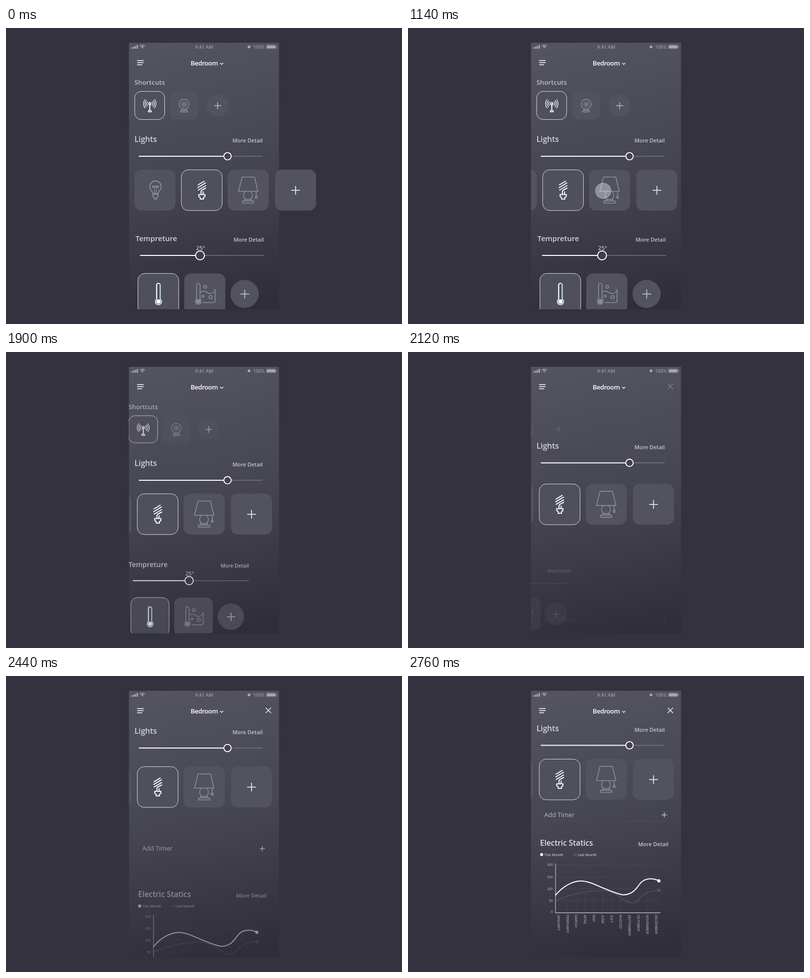
These frames come from a looping animation (800x600 px, 5260 ms). An HTML page:

```html
<!DOCTYPE html>
<html lang="en">
<head>
<meta charset="utf-8">
<title>Smart home</title>
<style>
html, body { margin: 0; width: 100%; height: 100%; overflow: hidden; background: #35323f; }
svg { display: block; width: 800px; height: 600px; }
text { font-family: "Open Sans", "Noto Sans", sans-serif; font-weight: 600; fill: #d3d3d8; }
.h { font-size: 15.4px; }
.more { font-size: 10.9px; fill: #c6c6cc; text-anchor: end; }
.status { font: 400 9.8px Roboto, sans-serif; fill: #a9a9b1; }
.tiny { font: 400 6.9px "Liberation Sans", Arial, sans-serif; fill: #b4b4bb; }
.card { fill: #52535e; }
.on { fill: #4f505c; stroke: #dcdce0; stroke-width: 1; }
.line { fill: none; stroke: #fff; stroke-width: 2; stroke-linecap: round; stroke-linejoin: round; }
.dim { stroke: #8f8f98; stroke-width: 1.6; }
.rest { stroke: #74747e; stroke-width: 1.6; }

.move { animation: 5260ms cubic-bezier(.333, 0, .667, 1) infinite both; }
.scroll { animation-name: scroll; animation-timing-function: cubic-bezier(.33, 0, .28, 1); }
.touch { animation-name: drag, tap; animation-timing-function: cubic-bezier(.33, 0, .28, 1), linear; }
.exit { animation-name: shrink, leave; animation-timing-function: cubic-bezier(.333, 0, .667, .333), cubic-bezier(.333, 0, .667, 0); }
.shortcuts { --dx: -186px; --size: .84; transform-origin: 355px 147px; }
.heat { --dx: -266px; --size: .714; transform-origin: 391px 501px; }
.head { animation-name: head; }
.cards { animation-name: cards; }
.timer { animation-name: timer; }
.stats { animation-name: stats; }
.close { animation-name: close; }

@keyframes scroll { 0%, 14.829% { translate: 0 0; } 24.715%, 100% { translate: -89px 0; } }
@keyframes drag { 0%, 14.829% { translate: 0 0; } 24.715%, 100% { translate: -122px 0; } }
@keyframes tap { 0%, 14.829% { opacity: 0; } 17.5%, 22% { opacity: 1; } 24.715%, 100% { opacity: 0; } }
@keyframes shrink { 0%, 31.179% { scale: 1; opacity: 1; } 41.825%, 100% { scale: var(--size); opacity: 0; } }
@keyframes leave { 0%, 31.749% { translate: 0 0; } 41.825%, 100% { translate: var(--dx) 0; } }
@keyframes head { 0%, 36.027% { translate: 0 0; } 47.959%, 100% { translate: 0 -119.5px; } }
@keyframes cards { 0%, 37.262% { translate: 0 0; } 49.049%, 100% { translate: 0 -119px; } }
@keyframes timer { 0%, 38.403% { translate: 0 281px; opacity: 0; } 50.19%, 100% { translate: 0 0; opacity: 1; } }
@keyframes stats { 0%, 40.684% { translate: 0 200px; opacity: 0; } 52.471%, 100% { translate: 0 0; opacity: 1; } }
@keyframes close { 0%, 36.027% { opacity: 0; } 47.959%, 100% { opacity: 1; } }
</style>
</head>
<body>
<svg viewBox="0 0 800 600">
  <defs>
    <linearGradient id="screen" gradientUnits="userSpaceOnUse" x1="345" y1="30" x2="455" y2="570">
      <stop offset="0" stop-color="#53545f"/>
      <stop offset=".45" stop-color="#474753"/>
      <stop offset="1" stop-color="#302d38"/>
    </linearGradient>
    <clipPath id="edge"><rect x="248.5" y="30" width="551.5" height="540"/></clipPath>
  </defs>
  <rect width="800" height="600" fill="#35323f"/>
  <rect x="248.5" y="30" width="303" height="540" fill="url(#screen)"/>

  <!-- status bar -->
  <g fill="#a9a9b1">
    <path d="M253.5 39h2.4v3h-2.4zM257 37.5h2.4v4.5h-2.4zM260.5 36h2.4v6h-2.4zM264 34.5h2.6v7.5h-2.6z"/>
    <path d="M273.7 39.6a2.5 2.5 0 0 1 3.6 0l-1.8 2.2z"/>
    <path class="line" style="stroke:#a9a9b1;stroke-width:1.4;stroke-linecap:butt" d="M270.5 36.8a7 7 0 0 1 10 0M272.5 38.6a4.4 4.4 0 0 1 6 0"/>
    <circle cx="491" cy="38.3" r="2.8"/>
    <rect x="527" y="35.5" width="17" height="5.6" rx="1"/>
    <rect x="526" y="34.5" width="19" height="7.6" rx="1.6" fill="none" stroke="#a9a9b1" stroke-width=".6"/>
    <rect x="545.6" y="37" width="1.2" height="2.6"/>
  </g>
  <text class="status" x="382" y="42">9:41 AM</text>
  <text class="status" x="499" y="42">100%</text>

  <!-- title bar -->
  <path class="line" style="stroke-width:1.6" d="M265.5 66h12M265.5 70.3h12M265.5 74.5h9"/>
  <text x="373" y="76" font-size="13" letter-spacing="-.42" style="fill:#fff">Bedroom</text>
  <path class="line" style="stroke-width:1.4" d="M433 71.3l2.8 2.5 2.8-2.5"/>
  <path class="line move close" style="stroke-width:1.3" d="M525 64.8l10 10M535 64.8l-10 10"/>

  <g clip-path="url(#edge)">
    <g class="move exit shortcuts">
      <text x="259.5" y="115" font-size="13.3" style="fill:#bfbfc6">Shortcuts</text>
      <rect class="on" x="260" y="128.5" width="60.5" height="57" rx="13"/>
      <g class="line" style="stroke-width:1.5">
        <circle cx="290.5" cy="153.5" r="2.2" stroke-width="2"/>
        <g stroke-linecap="butt" stroke-width="1.3">
          <circle cx="290.5" cy="153.5" r="6.2" pathLength="360" stroke-dasharray="90 90" stroke-dashoffset="45"/>
          <circle cx="290.5" cy="153.5" r="9.4" pathLength="360" stroke-dasharray="90 90" stroke-dashoffset="45"/>
          <circle cx="290.5" cy="153.5" r="12.6" pathLength="360" stroke-dasharray="90 90" stroke-dashoffset="45"/>
        </g>
        <path stroke-width="2" d="M290.5 156.5v10"/>
        <path d="M287.5 167.5h6v2.5h-6z"/>
      </g>
      <rect class="card" x="331" y="128.5" width="57.5" height="57" rx="12"/>
      <g class="line dim" style="stroke-width:1.4">
        <circle cx="359.8" cy="154.5" r="10"/>
        <circle cx="359.8" cy="154.5" r="4.6"/>
        <circle cx="359.8" cy="154.5" r="1.7"/>
        <path d="M356 164.5l-1 2.5h9.6l-1-2.5M353.3 167.3h13v3h-13z"/>
      </g>
      <circle class="card" cx="427.4" cy="157" r="22.5"/>
      <path class="line" style="stroke:#b0b0b7;stroke-width:1.7" d="M421 157.4h13M427.5 151v13"/>
    </g>

    <g class="move exit heat">
      <text class="h" x="261.5" y="432" style="font-size:14.9px">Tempreture</text>
      <text class="more" x="521" y="433">More Detail</text>
      <text x="384" y="449.5" style="font-size:11.6px;font-weight:400;fill:#eee">25°</text>
      <path class="line rest" d="M392 461h128.500"/>
      <path class="line" d="M271.500 461H392"/>
      <circle cx="392" cy="461" r="9" fill="#3f3d49" stroke="#fff" stroke-width="2"/>
      <rect class="on" x="266.500" y="497.500" width="82.500" height="83" rx="14"/>
      <path class="line" style="stroke:#c9eefa" d="M304.500 549.500v-28.500a3.500 3.500 0 0 1 7 0v28.500a6.200 6.200 0 1 1-7 0z"/>
      <path class="line" style="stroke-width:1.600" d="M304.200 549v-28a3.500 3.500 0 0 1 3.500-3.500"/>
      <circle cx="308" cy="554.300" r="4.400" fill="#fff"/>
      <rect class="card" x="360" y="497.500" width="83" height="83" rx="14"/>
      <g class="line dim">
        <path d="M385 549v-28a3.500 3.500 0 0 1 7 0v28a6 6 0 1 1-7 0z"/>
        <circle cx="388.500" cy="554" r="3.600" fill="#8f8f98"/>
        <path d="M419.500 530.500h3v22q0 4-4 4h-20M392.500 535.500c6-4 10-2 14 1s10 2 15.500-3"/>
        <circle cx="402.500" cy="524.500" r="3"/>
        <circle cx="398.200" cy="543.500" r="2"/>
        <circle cx="413.300" cy="545.500" r="3.200"/>
      </g>
      <circle class="card" cx="482" cy="539" r="28.500"/>
      <path class="line" style="stroke:#b4b4bb" d="M474 539.200h16.500M482.300 531v16.500"/>
    </g>

    <g class="move head">
      <text class="h" x="259.500" y="231" style="font-size:15.700px">Lights</text>
      <text class="more" x="518.800" y="232">More Detail</text>
      <path class="line rest" d="M447.500 260H518"/>
      <path class="line" d="M269 260h178.500"/>
      <circle cx="447.500" cy="260" r="7.400" fill="#43424e" stroke="#fff" stroke-width="1.900"/>
    </g>

    <g class="move cards">
      <g class="move scroll">
        <rect class="card" x="259.500" y="287" width="83" height="83" rx="14"/>
        <g class="line dim" style="stroke-width:1.800">
          <path d="M297.500 336c0-4-7-7-7-14.500a11.500 11.500 0 0 1 23 0c0 7.500-7 10.500-7 14.500zM296.500 337h11v4l-3 2.500v3h-5v-3l-3-2.500z"/>
          <path d="M300.300 335.500v-10M303.700 335.500v-10M295.500 323c0-4 4-4 4 0 0-4 5-4 5 0 0-4 4-4 4 0z" stroke-width="1.300"/>
        </g>

        <rect class="on" x="354.200" y="287.500" width="82.500" height="82.500" rx="14"/>
        <path class="line" d="M388 318l12.500-7.500M387.500 323.500l15.500-9.300M388.500 328.500l15-9M394 335.500v-3.500q0-3 4-4.500l5.500-3M398.300 332v4M389.500 337.500h12.500v4l-3 2.300v3h-6.500v-3l-3-2.300z"/>

        <rect class="card" x="447.800" y="287" width="83" height="83" rx="14"/>
        <path class="line dim" d="M477 302.300h25l7 28.700h-39.300zM483 331.500c-4 5-4 11 1 16h10c5-5 5-11 1-16M482.500 347.800h13l1 2.700h-15zM478 350.700h22.500v4.300H478zM505.500 331.500v9.500M503.700 341.300h3.600v3.600h-3.600z"/>

        <rect class="card" x="543.300" y="287" width="83" height="83" rx="14"/>
        <path class="line" style="stroke:#d6d6da" d="M577 329h16M585 321v16"/>
      </g>
    </g>

    <g class="move timer">
      <text x="275.300" y="286" style="font-size:12.700px;font-weight:400;fill:#babac1">Add Timer</text>
      <path class="line" style="stroke:#c0c0c6;stroke-width:1.600" d="M513 281.500h9.500M517.700 276.800v9.500"/>
      <path class="line" style="stroke:#4e4d59;stroke-width:1" d="M273.500 293.500h252"/>
    </g>

    <g class="move stats">
      <text class="h" x="266.800" y="344" style="fill:#e2e2e6">Electric Statics</text>
      <text class="more" x="526.300" y="345">More Detail</text>
      <circle cx="270" cy="362" r="3.100" fill="#fff"/>
      <text class="tiny" x="275.500" y="364.600" style="fill:#d5d5da">This Mounth</text>
      <circle cx="338" cy="362" r="3" fill="#53535d"/>
      <text class="tiny" x="343" y="364.600" style="fill:#d5d5da">Last Mounth</text>
      <g id="chart"></g>
      <path class="line" style="stroke:#5c5b66;stroke-width:1.200" d="M298 456C318 446 355 435 388 435C428 435 432 460 453 460C471 460 464 436 507 434.500"/>
      <circle cx="506.800" cy="434.600" r="3.100" fill="#55555f"/>
      <path class="line" style="stroke:#b9b9c0;stroke-width:1.300;stroke-linecap:butt" d="M298 380v100h212"/>
      <path class="line" d="M298.300 444C312 427 332 415.500 349 415.500C372 415.500 395 434 433 443.500C453 444.500 461 431 467 423C476 410 491 408 507 415"/>
      <circle cx="506.800" cy="415.200" r="3.200" fill="#fff"/>
    </g>

    <circle class="move touch" cx="507" cy="330" r="15.500" fill="#fff" fill-opacity=".36" stroke="#fff" stroke-opacity=".3" stroke-width="1.500"/>
  </g>
</svg>
<script>
const chart = document.getElementById("chart");
const months = "JANUARY FEBRUARY MARCH APRIL MAY JUNE JULY AUGUST SEPTEMBER OKTOBER NOVEMBER DECEMBER".split(" ");
const grid = d => `<path d="${d}" fill="none" stroke="#fff" stroke-opacity=".06"/>`;
const label = (text, attrs) => `<text class="tiny" ${attrs}>${text}</text>`;

const rows = [300, 200, 100, 50, 0].map((value, i) => {
  const y = i < 4 ? 383 + i * 24.1 : 478;
  return label(value, `x="292.5" y="${y + 2.4}" text-anchor="end"`) + (i < 4 ? grid(`M298 ${y}H510`) : "");
});
const columns = months.map((name, i) => {
  const x = 304 + i * 17.9;
  return label(name, `transform="translate(${x - 2.4} 484) rotate(90)"`) + grid(`M${x} 436V480`);
});
chart.innerHTML = rows.concat(columns).join("");
</script>
</body>
</html>
```
